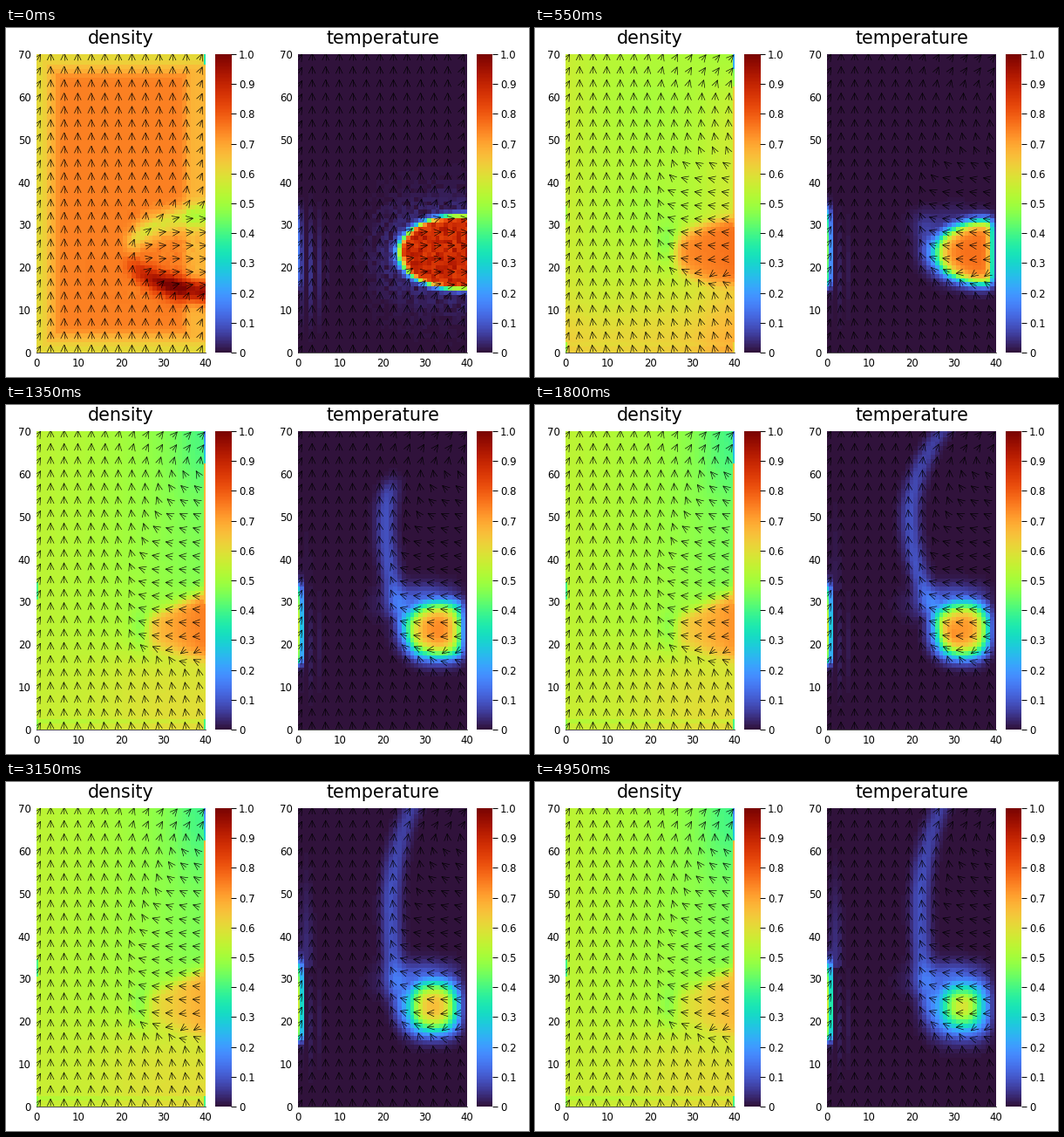
These frames come from a looping animation (600 px wide and 400 px high, 5000 ms). A matplotlib script:

```python
import numpy as np
import matplotlib.pyplot as plt
from matplotlib.animation import FuncAnimation
from matplotlib.collections import LineCollection

W, H, DPI = 600, 400, 100
FRAMES, STEP = 100, 50
TOP, BOTTOM, WIDTH = 30, 372, 194
PX = WIDTH / 40
PY = (BOTTOM - TOP) / 70

plt.rcParams["font.family"] = "DejaVu Sans"
fig = plt.figure(figsize=(W / DPI, H / DPI), dpi=DPI, facecolor="white")

X, Y = np.meshgrid(np.arange(41.0), np.arange(71.0))
noise = np.random.RandomState(4).uniform(-1, 1, X.shape)

# Arrow tails in data units
AX, AY = np.meshgrid((0.6 + 15.55 * np.arange(13)) / PX,
                     (0.7 + 15.2 * np.arange(23)) / PY)
AX, AY = AX.ravel(), AY.ravel()


def sig(z):
    return 1 / (1 + np.exp(-np.clip(z, -40, 40)))


def bump(x, y, cx, cy, sx, sy):
    return np.exp(-((x - cx) / sx) ** 2 - ((y - cy) / sy) ** 2)


def ramp(t, a, b):
    s = np.clip((t - a) / (b - a), 0, 1)
    return s * s * (3 - 2 * s)


def half_ellipse(x, y, rx, ry):
    """Rough distance inside an ellipse open towards the right wall."""
    dx = np.minimum(x - 38, 0) / rx
    return (1 - np.hypot(dx, (y - 23.5) / ry)) * 9


def density_start():
    edge = np.minimum(np.minimum(X, 40 - X), np.minimum(Y, 70 - Y))
    d = 0.75 - 0.075 * sig((4.7 - edge) * 2)
    d -= 0.07 * sig((2.4 - np.minimum(X, np.minimum(Y, 70 - Y))) * 2)
    bend = 7.3 * (1 - np.exp(-np.maximum(X - 22, 0) / 9))
    right = sig((X - 22) * 1.2)
    d -= 0.16 * right * np.exp(-((Y - 26 - bend) / 3) ** 2)
    strength = 0.12 + 0.16 * np.clip((X - 23) / 9, 0, 1)
    d += strength * right * np.exp(-((Y - 20.5 + bend) / 2.7) ** 2)
    d += 0.012 * noise * right * (abs(Y - 24) < 12)
    d[68:, 40] = 0.35
    return d


def density_early():
    d = 0.54 - 0.03 * bump(X, Y, 18, 58, 9, 9) - 0.035 * bump(X, Y, 19, 34, 8, 7)
    d += 0.1 * sig((8 - Y) / 3) + 0.02 * sig((20 - Y) / 4)
    d += 0.10 * sig((X - 34) / 2.5) * sig((66 - Y) / 4)
    d += 0.03 * sig((4 - X) / 1.5)
    d -= 0.09 * bump(X, Y, 24, 26, 2.5, 5)
    inside = sig(half_ellipse(X, Y, 12, 7.7) * 1.6)
    d += (0.76 - d) * inside
    d[67:, 40] = 0.25
    d[0:3, 0] = 0.5
    return d


def density_late(t):
    d = 0.54 - 0.0018 * X * sig((Y - 20) / 6)
    d -= 0.015 * sig((X - 25) / 4) * sig((Y - 31) / 2)
    d += 0.015 * sig((17 - Y) / 4) + 0.05 * sig((X - 20) / 5) * sig((18 - Y) / 2)
    d -= (0.05 + 0.02 * ramp(t, 0.9, 2)) * sig((X - 34) / 2.2) * sig((Y - 58) / 3.5)
    d -= 0.05 * bump(X, Y, 24.5, 23.5, 2.2, 5)
    hot = np.interp(t, [0.9, 1.8, 3.15, 4.95], [0.69, 0.63, 0.595, 0.575])
    tone = hot + 0.09 * np.clip((X - 27) / 12, 0, 1)
    wedge = (sig((X - 26.5) * 1.2) * sig((27 + (X - 28) * 0.42 - Y) * 1.3)
             * sig(Y - 19.5 + (X - 28) * 0.25))
    d += (tone - d) * wedge
    d[2] -= 0.03
    d[30:63, 40] = 0.67
    d[63:, 40] = np.linspace(0.3, 0.15, 8)
    d[0:3, 40] = 0.4
    d[0:3, 0] = 0.48
    d[31:35, 0] = 0.4
    return d


START, EARLY = density_start(), density_early()


def density(t):
    if t < 0.3:
        k = t / 0.3
        return START + (EARLY - START) * k
    k = ramp(t, 0.3, 0.9)
    return EARLY + (density_late(max(t, 0.9)) - EARLY) * k


def plume(t):
    swing = np.exp(-((t - 1.8) / 0.6) ** 2)
    y0 = 47 + 3 * swing
    rise = np.where(Y > y0, 4.8 + 5 * swing, 2 + 4 * swing)
    center = 22 - 2.3 * swing + rise * ((Y - y0) / 23) ** 2
    head = 26.5 + (t - 0.4) * 33
    strength = 0.09 * ramp(t, 0.3, 0.8)
    body = np.exp(-((X - center) / 2.3) ** 2)
    fade = 1 - 0.3 * sig((Y - 58) / 3)
    return strength * fade * body * sig((head - Y) / 1.2) * sig((Y - 21) / 2)


def temperature(t):
    dist = half_ellipse(X, Y, 14.2, 8.6)
    soft = np.interp(t, [0, 0.3, 0.9, 2], [0.33, 0.7, 1.0, 1.2])
    peak = np.interp(t, [0, 0.3, 0.9, 2], [0.89, 0.77, 0.77, 0.75])
    shrink = np.interp(t, [0, 0.3, 0.9, 2], [0, 1.0, 1.9, 2.4])
    early = peak * sig((dist - shrink) / soft)
    wall = sig((38.9 - X) / 0.45)
    early *= 1 - (1 - wall) * ramp(t, 0, 0.3)

    age = max(t, 1.2) - 1.8
    reach = np.where(X > 32.3, 0.92, 1.03)
    r = (abs((X - 32.3) / reach) ** 2.4 + abs(Y - 23.5) ** 2.4) ** (1 / 2.4)
    late = np.exp(-(r / (6.6 - 0.28 * age)) ** (3.4 - 0.4 * age))
    late *= (0.79 - 0.042 * t) * sig((39.2 - X) * 3)

    k = ramp(t, 0.5, 1.9)
    temp = early * (1 - k) + late * k
    halo = 0.14 * ramp(t, 0.2, 1) * bump(X, Y, 30, 29.5, 8, 4) * sig((39 - X) * 2)
    temp = np.maximum(temp, halo) + plume(t)

    shock = np.exp(-t / 0.12)
    temp += shock * 0.05 * noise * (temp > 0.6)
    ring = abs(np.sin(1.7 * dist + noise)) * np.exp(-np.maximum(-dist, 0) / 5)
    temp += shock * 0.06 * ring * (dist < -0.5) * sig((X - 16) / 2)
    temp += (0.02 + 0.03 * shock) * bump(X, Y, 3, 20, 3, 11) * (X % 2 == 1)

    span = sig((Y - 15.5) * 2) * sig(33.5 - Y)
    arch = 0.75 + 0.25 * np.exp(-((Y - 24) / 6) ** 2)
    strip = span * arch
    first = np.interp(t, [0, 0.3, 0.9, 5], [0.15, 0.38, 0.56, 0.56])
    second = np.interp(t, [0, 0.3, 0.9, 5], [0.03, 0.13, 0.24, 0.34])
    temp[:, 0] += (first * strip)[:, 0]
    temp[:, 1] += (second * strip)[:, 1]
    trail = 0.04 * ramp(t, 0.5, 4) * bump(X, Y, 2, 36, 1.5, 16) * (Y > 32)
    return np.clip(temp + trail, 0, 1)


def flow(t):
    x, y = AX, AY
    k = 1 - np.exp(-t / 0.2)
    hot = sig(half_ellipse(x, y, 14, 9) * 1.5)
    under = bump(x, y, 34, 15, 8, 4)
    over = bump(x, y, 36, 33, 6, 4)
    u0 = 1.8 * hot + 0.5 * under + 0.6 * over + 0.4 * (x > 36)
    v0 = 1 - 0.85 * hot

    ceiling = min(63, 33 + 20 * t)
    x0 = 25 + 0.35 * np.maximum(y - 37, 0)
    inflow = sig((x - x0) / 1.2) * sig((y - 19) / 1.2) * sig((ceiling - y) / 2)
    low = sig((46 - y) / 3)
    u1 = -0.15 * sig((x - 12) / 3) * sig((58 - y) / 4)
    u1 -= (1 + 1.2 * low) * inflow
    u1 -= 0.35 * np.exp(-t / 0.6) * sig((14 - y) / 3)
    v1 = 1 - (0.2 + 0.6 * low) * inflow
    u1 += 1.1 * sig((y - 63) / 2) * sig((x - 25) / 4)
    sink = bump(x, y, 36.5, 18.5, 4.5, 3)
    u1 -= 0.6 * sink
    v1 -= 2.1 * sink

    u = u0 * (1 - k) + u1 * k + 0.6 * (x < 1)
    v = v0 * (1 - k) + v1 * k
    return np.arctan2(v, u)


def arrow_lines(t, stem=8, barb=9, spread=0.45):
    """Each arrow is a stem and two barbs, sized in pixels."""
    a = flow(t)

    def shift(p, angle, length):
        return p + length * np.stack([np.cos(angle) / PX, np.sin(angle) / PY], 1)

    tail = np.stack([AX, AY], 1)
    tip = shift(tail, a, stem)
    left = shift(tip, a + np.pi - spread, barb)
    right = shift(tip, a + np.pi + spread, barb)
    return [*np.stack([tail, tip], 1), *np.stack([left, tip, right], 1)]


def pixel_axes(x, w):
    return fig.add_axes([x / W, 1 - BOTTOM / H, w / W, (BOTTOM - TOP) / H])


def make_panel(x, title):
    ax = pixel_axes(x, WIDTH)
    image = ax.imshow(np.zeros_like(X), cmap="turbo", vmin=0, vmax=1,
                      origin="lower", extent=(-0.5, 40.5, -0.5, 70.5),
                      aspect="auto", interpolation="nearest")
    arrows = LineCollection([], colors="black", linewidths=0.45)
    ax.add_collection(arrows)
    ax.set(xlim=(0, 40), ylim=(0, 70),
           xticks=range(0, 41, 10), yticks=range(0, 71, 10))
    ax.tick_params(length=0, pad=4.6, labelsize=8.4)
    for side, spine in ax.spines.items():
        spine.set_visible(side in ("left", "bottom"))
        spine.set(linewidth=0.5, zorder=-1)
    fig.text((x + WIDTH / 2) / W, 1 - 18.5 / H, title, fontsize=14.9,
             ha="center", va="baseline")

    bar = pixel_axes(x + 205, 18)
    bar.imshow(np.linspace(0, 1, 256)[:, None], cmap="turbo", origin="lower",
               extent=(0, 1, 0, 1), aspect="auto")
    ticks = np.arange(11) / 10
    bar.set_yticks(ticks, ["0"] + [f"{v:.1f}" for v in ticks[1:]])
    bar.set_xticks([])
    bar.yaxis.tick_right()
    bar.tick_params(length=4.5, width=0.7, pad=1.8, labelsize=8.4)
    for spine in bar.spines.values():
        spine.set_visible(False)
    return image, arrows


panels = [(*make_panel(35, "density"), density),
          (*make_panel(335, "temperature"), temperature)]


def update(i):
    t = i * STEP / 1000
    lines = arrow_lines(t)
    artists = []
    for image, arrows, field in panels:
        image.set_data(field(t))
        arrows.set_segments(lines)
        artists += [image, arrows]
    return artists


anim = FuncAnimation(fig, update, frames=FRAMES, interval=STEP, repeat=True)
plt.show()
```
